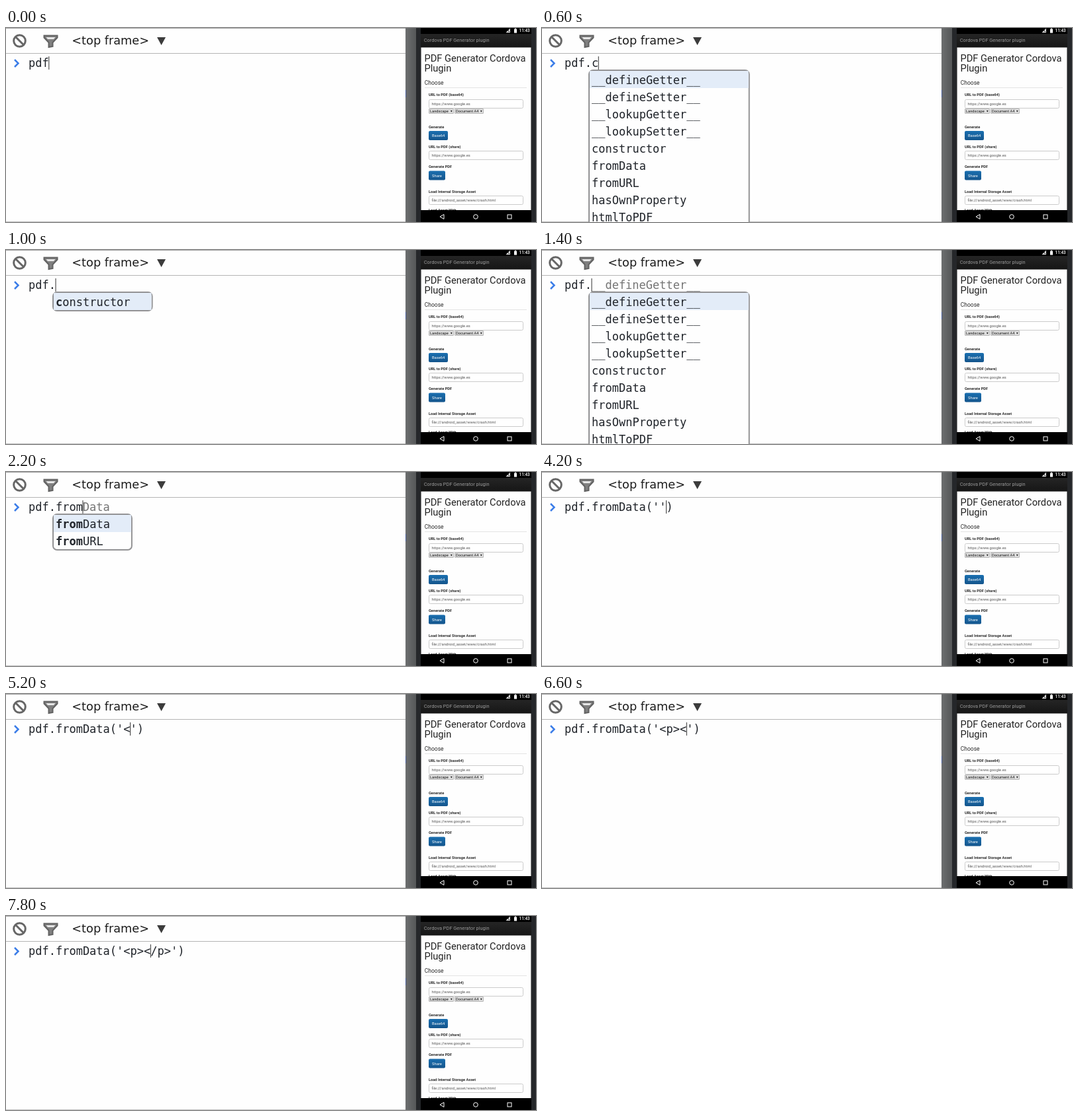
Animation, 800 px wide and 294 px high, one loop 8000 ms. Source, as an HTML page with a canvas:

```html
<!DOCTYPE html>
<html lang="en">
<head>
<meta charset="utf-8">
<title>Console typing</title>
<style>
html, body { margin: 0; width: 100%; height: 100%; overflow: hidden; background: #fefefe; }
canvas { display: block; width: 800px; height: 294px; }
</style>
</head>
<body>
<canvas id="stage"></canvas>
<script>
const W = 800, H = 294, LOOP = 8000;
const canvas = document.getElementById('stage');
const ctx = canvas.getContext('2d');
const dpr = window.devicePixelRatio || 1;
canvas.width = W * dpr;
canvas.height = H * dpr;
ctx.scale(dpr, dpr);

const MONO = '17px "DejaVu Sans Mono", monospace';
const SANS = 'Roboto, sans-serif';
const PAPER = '#fefefe', INK = '#20242a';
const TEXT_X = 34, CHAR = 10.234, ROW = 26;

const ALL = ['__defineGetter__', '__defineSetter__', '__lookupGetter__', '__lookupSetter__',
  'constructor', 'fromData', 'fromURL', 'hasOwnProperty', 'htmlToPDF'];
const FROM = ['fromData', 'fromURL'];
const CTOR = ['constructor'];

// "|" marks the caret; ghost is the greyed completion, match the bold prefix length
const call = (arg) => ({ line: 'pdf.fromData(' + arg });
const steps = [
  [0, { line: 'pdf|' }],
  [400, { line: 'pdf.|', ghost: ALL[0], list: ALL }],
  [600, { line: 'pdf.c|', list: ALL }],
  [800, { line: 'pdf.c|', ghost: 'onstructor', list: CTOR, match: 1 }],
  [1000, { line: 'pdf.|', list: CTOR, match: 1 }],
  [1200, { line: 'pdf.|' }],
  [1400, { line: 'pdf.|', ghost: ALL[0], list: ALL }],
  [1600, { line: 'pdf.f|', list: ALL }],
  [1800, { line: 'pdf.fr|', ghost: 'omData', list: FROM, match: 2 }],
  [2000, { line: 'pdf.fro|', ghost: 'mData', list: FROM, match: 3 }],
  [2200, { line: 'pdf.from|', ghost: 'Data', list: FROM, match: 4 }],
  [2600, { line: 'pdf.fromData|' }],
  [3000, call('|')],
  [3600, call(')|')],
  [3800, call('|)')],
  [4000, call("'|)")],
  [4200, call("''|)")],
  [4400, call("'|')")],
  [4800, call("'>|')")],
  [5000, call("'|')")],
  [5200, call("'<|')")],
  [5400, call("'<>|')")],
  [5600, call("'<|>')")],
  [5800, call("'<p|>')")],
  [6200, call("'<p>|')")],
  [6600, call("'<p><|')")],
  [6800, call("'<p><>|')")],
  [7000, call("'<p><|>')")],
  [7200, call("'<p><p|>')")],
  [7600, call("'<p><|p>')")],
  [7800, call("'<p><|/p>')")]
];

function rect(x, y, w, h, fill) {
  ctx.fillStyle = fill;
  ctx.fillRect(x, y, w, h);
}

function box(x, y, w, h, r, fill, stroke, width = 1) {
  ctx.beginPath();
  ctx.roundRect(x, y, w, h, r);
  ctx.fillStyle = fill;
  ctx.fill();
  if (!stroke) return;
  ctx.strokeStyle = stroke;
  ctx.lineWidth = width;
  ctx.stroke();
}

function poly(points, fill, stroke, width = 1, closed = true) {
  ctx.beginPath();
  points.forEach(([x, y]) => ctx.lineTo(x, y));
  if (closed) ctx.closePath();
  if (fill) { ctx.fillStyle = fill; ctx.fill(); }
  if (stroke) { ctx.strokeStyle = stroke; ctx.lineWidth = width; ctx.stroke(); }
}

function circle(x, y, r, stroke, width) {
  ctx.beginPath();
  ctx.arc(x, y, r, 0, Math.PI * 2);
  ctx.strokeStyle = stroke;
  ctx.lineWidth = width;
  ctx.stroke();
}

function text(str, x, y, font, fill) {
  ctx.font = font;
  ctx.fillStyle = fill;
  ctx.fillText(str, x, y);
}

function gradient(x0, y0, x1, y1, from, to) {
  const g = ctx.createLinearGradient(x0, y0, x1, y1);
  g.addColorStop(0, from);
  g.addColorStop(1, to);
  return g;
}

function drawToolbar() {
  rect(0, 0, 603, 1, '#a6a6a6');
  rect(0, 38, 603, 1, '#b4b4b4');

  const grey = '#666';
  circle(20.5, 19.5, 8.8, grey, 3);
  poly([[14.5, 13.5], [26.5, 25.5]], null, grey, 3, false);

  poly([[57.5, 11.5], [77.5, 11.5], [77.5, 14.5], [70.5, 22], [70.5, 28],
    [64.5, 29], [64.5, 22], [57.5, 14.5]], '#808080', '#626262', 2);
  poly([[60.5, 14], [74.5, 14], [72, 17], [63, 17]], '#e6e6e6');

  text('<top frame>', 99.3, 25, '17.7px "DejaVu Sans", sans-serif', '#1c1c1c');
  poly([[228, 14], [241, 14], [234.5, 26]], '#3c3c3c');
}

function drawField(y, value) {
  box(638.5, y + .5, 142, 13, 2, '#fff', '#c6c6c6', .9);
  text(value, 642.5, y + 9, '5.8px ' + SANS, '#555');
}

function drawSelect(x, w, value) {
  box(x + .5, 122.5, w - 1, 7, .5, '#dedede', '#aaa', .8);
  text(value, x + 2, 128, '5.7px ' + SANS, '#111');
  const a = x + w - 5;
  poly([[a, 125], [a + 2.6, 125], [a + 1.3, 127.4]], '#111');
}

function drawButton(y, w, label) {
  box(638, y, w, 14, 2, gradient(0, y, 0, y + 14, '#1a6fb0', '#14558c'));
  text(label, 643, y + 9, '5.8px ' + SANS, '#fff');
}

function drawLabel(str, y) {
  text(str, 638, y, 'bold 5.7px ' + SANS, '#2a2a2a');
}

function drawPhone() {
  rect(603, 0, 16, H, gradient(603, 0, 619, 0, '#6d6f70', '#555758'));
  rect(603, 94, 1, 11, '#4a5f9a');
  rect(619, 0, 181, H, '#25272a');
  rect(626, 0, 167, H, '#000');

  poly([[754.5, 7], [761, 7], [761, .5]], '#ddd');
  poly([[755, 1], [760, 6]], null, '#000', 1, false);
  rect(767, 1.5, 4, 6, '#fff');
  rect(768, .5, 2, 1, '#fff');
  text('11:43', 774.5, 6, '500 6.4px ' + SANS, '#fff');

  rect(626, 9, 167, 21, gradient(0, 9, 0, 29, '#252525', '#161616'));
  text('Cordova PDF Generator plugin', 630.7, 21, '7.4px ' + SANS, '#999');

  ctx.save();
  ctx.beginPath();
  ctx.rect(626.5, 29.5, 166, 246.5);
  ctx.clip();
  rect(626, 29, 167, 247, PAPER);
  const h1 = '14.7px ' + SANS;
  text('PDF Generator Cordova', 631.4, 50.5, h1, '#222');
  text('Plugin', 631.4, 66, h1, '#222');
  text('Choose', 631.8, 86, '8.5px ' + SANS, '#2a2a2a');
  rect(632, 90, 154, 1, '#e3e3e3');

  drawLabel('URL to PDF (base64)', 103);
  drawField(108, 'https://www.google.es');
  drawSelect(638, 38, 'Landscape');
  drawSelect(677, 44, 'Document A4');
  drawLabel('Generate', 152);
  drawButton(156, 29, 'Base64');
  drawLabel('URL to PDF (share)', 182);
  drawField(186, 'https://www.google.es');
  drawLabel('Generate PDF', 212);
  drawButton(216.5, 25, 'Share');
  drawLabel('Load Internal Storage Asset', 250);
  drawField(254, 'file:///android_asset/www/crash.html');
  drawLabel('Load Asset With', 278);
  ctx.restore();

  poly([[661, 282.5], [661, 289.5], [655, 286]], null, '#fff', 1);
  circle(709, 286, 3.3, '#fff', 1);
  ctx.strokeRect(757, 283, 6, 6);
}

function drawPopup(list, match = 0) {
  const chars = list === ALL ? 20 : list[0].length;
  const w = chars * CHAR + 37;
  const h = list === ALL ? 260 : list.length * ROW + 2;
  box(71, 64, w, h, 6, PAPER, '#929294', 2);
  rect(72, 65, w - 2, 26, '#e3ecf8');
  list.forEach((item, i) => {
    const y = 85 + i * ROW;
    text(item.slice(0, match), 75, y, 'bold ' + MONO, INK);
    text(item.slice(match), 75 + match * CHAR, y, MONO, INK);
  });
}

function drawConsole({ line, ghost, list, match }) {
  poly([[13, 48], [18.5, 53.5], [13, 59]], null, '#3b7de8', 2.5, false);
  const caret = line.indexOf('|');
  const typed = line.replace('|', '');
  text(typed, TEXT_X, 59, MONO, INK);
  if (ghost) text(ghost, TEXT_X + typed.length * CHAR, 59, MONO, '#747474');
  rect(TEXT_X + caret * CHAR - .4, 43, 1, 20, '#333');
  if (list) drawPopup(list, match);
}

function draw(state) {
  rect(0, 0, W, H, PAPER);
  drawToolbar();
  rect(0, 293, 603, 1, '#c4c4c4');
  drawConsole(state);
  drawPhone();
}

const start = performance.now();
function tick() {
  const t = (performance.now() - start) % LOOP;
  draw(steps.filter(([at]) => at <= t).pop()[1]);
  requestAnimationFrame(tick);
}
tick();
</script>
</body>
</html>
```
